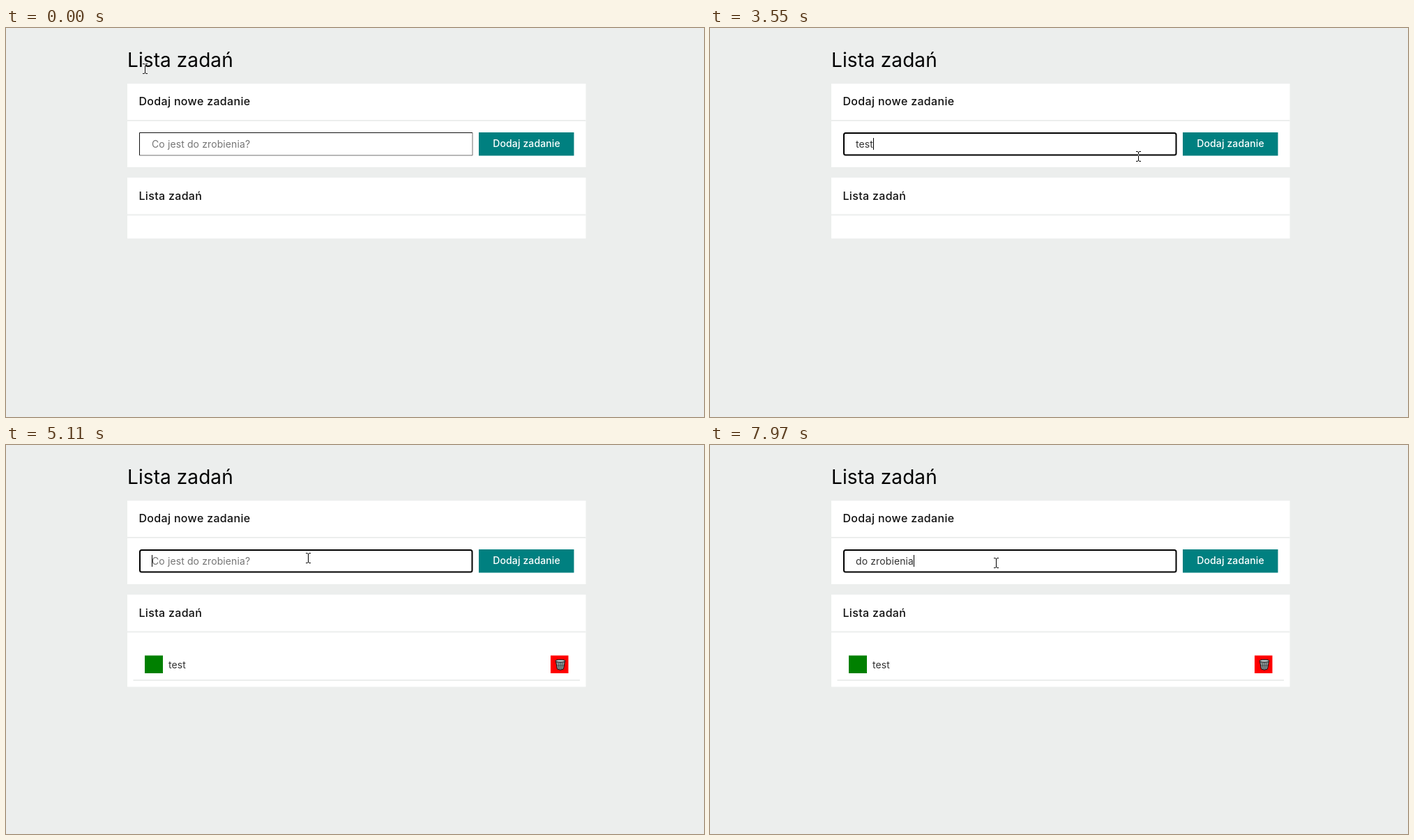
Recreate the animation shown at these times as an HTML page. Size 1001x559 px, loop 8000 ms.

```html
<!DOCTYPE html>
<html lang="pl">
<head>
<meta charset="utf-8">
<title>Lista zadań</title>
<style>
  html, body { margin: 0; width: 100%; height: 100%; overflow: hidden; }
  svg { display: block; width: 1001px; height: 559px; background: #eceeed; font: 14px Inter, "Open Sans", sans-serif; }
  .title { font-size: 28px; letter-spacing: .003em; }
  .head { font-size: 16px; font-weight: 500; letter-spacing: .02em; fill: #111; }
  .label { font-weight: 500; letter-spacing: .008em; fill: #fff; text-anchor: middle; }
  .field { letter-spacing: .008em; }
  .card { fill: #fff; }
  .line { fill: #eceeed; }
  #beam { mix-blend-mode: difference; }
</style>
</head>
<body>
<svg viewBox="0 0 1001 559">
  <text class="title" x="174" y="56">Lista zadań</text>

  <rect class="card" x="174" y="80" width="657.5" height="120"/>
  <rect class="line" x="174" y="132" width="657.5" height="2"/>
  <text class="head" x="190.5" y="111">Dodaj nowe zadanie</text>

  <g id="plain" fill="none">
    <path id="edgeDark" stroke="#111"/>
    <path id="edgeLight" stroke="#707070"/>
  </g>
  <rect id="ring" x="192" y="151" width="476.5" height="31.5" rx="2.5" fill="#fff" stroke="#000" stroke-width="2"/>
  <text class="field" id="value" x="209" y="171.5"></text>
  <rect id="caret" y="158" width="1" height="17"/>

  <rect id="button" y="150" height="33.5" fill="#008080"/>
  <rect id="buttonEdge" x="674" y="151" width="139.5" height="31.5" fill="none" stroke="#0b2f30" stroke-width="2"/>
  <text class="label" id="label" y="171">Dodaj zadanie</text>

  <rect class="card" id="list" x="174" y="215" width="657.5"/>
  <rect class="line" x="174" y="267.5" width="657.5" height="2"/>
  <text class="head" x="190.5" y="247">Lista zadań</text>

  <g id="item">
    <rect x="199" y="302.5" width="26" height="25.5" fill="#008000"/>
    <text class="field" x="233" y="320.5" fill="#333">test</text>
    <rect x="781" y="302.5" width="25.5" height="25.5" fill="#f00"/>
    <g stroke="#111" stroke-linejoin="round">
      <path d="M788.5 311 L790.5 322 Q795 324.5 799.5 322 L801.5 311 Z" fill="#8f9a9c"/>
      <path d="M792 313 L793 322 M795 313 V322.5 M798 313 L797 322 M790 317 H800" stroke="#3a4446" stroke-width=".8"/>
      <ellipse cx="795" cy="310.3" rx="7" ry="2" fill="#b4bec0"/>
    </g>
    <rect class="line" x="182.5" y="337" width="640.5" height="2"/>
  </g>

  <circle id="click" r="11" fill="#f5ea3c" fill-opacity=".62"/>
  <path id="beam" fill="none" stroke="#fff" d="M-3 -7 H-1 L0.5 -6 L2 -7 H4 M0.5 -6 V6 M-3 7 H-1 L0.5 6 L2 7 H4"/>
  <path id="arrow" fill="#fff" stroke="#111" stroke-linejoin="round"
        d="M.5 .5 V15.5 L4 12.2 L6.4 17.6 L8.8 16.5 L6.4 11.3 H11 Z"/>
</svg>
<script>
  const $ = id => document.getElementById(id);
  const LOOP = 8000, STEP = 67, KEY = 133, BLINK = 530;
  const FOCUS = 900, PRESS = 3880, ADD = 4020;

  const words = [
    { text: 'test', from: 1830, until: ADD },
    { text: 'do zrobienia', from: 6500, until: LOOP }
  ];

  // Pointer moves: each runs from where the last one ended
  const home = { x: 199, y: 58 };
  const moves = [
    { from: 70, to: 430, x: 266, y: 157 },
    { from: 1090, to: 1160, x: 283, y: 137 },
    { from: 3070, to: 3590, x: 645, y: 188 },
    { from: 3590, to: 3810, x: 718, y: 168 },
    { from: 4570, to: 5110, x: 446, y: 160 },
    { from: 5110, to: 5370, x: 384, y: 171 },
    { from: 5440, to: 5900, x: 410, y: 169 }
  ];

  function pointer(t) {
    let { x, y } = home;
    for (const move of moves) {
      if (t < move.from) break;
      const elapsed = (Math.floor((t - move.from) / STEP) + 1) * STEP;
      const p = t >= move.to ? 1 : Math.min(1, elapsed / (move.to - move.from + STEP));
      x += (move.x - x) * p;
      y += (move.y - y) * p;
    }
    return [Math.round(x), Math.round(y)];
  }

  // Text typed so far and the time of the last action in the field
  function typed(t) {
    const word = words.find(w => t >= w.from && t < w.until);
    if (!word) return { text: '', last: t >= ADD ? ADD : FOCUS };
    const count = Math.min(word.text.length, Math.floor((t - word.from) / KEY) + 1);
    return {
      text: word.text.slice(0, count).replace(/ $/, '\u00a0'),
      last: word.from + (count - 1) * KEY
    };
  }

  const show = (id, on) => $(id).setAttribute('visibility', on ? 'visible' : 'hidden');
  const set = (id, attrs) => {
    for (const key in attrs) $(id).setAttribute(key, attrs[key]);
  };

  function drawField(t, focused, right) {
    show('plain', !focused);
    show('ring', focused);
    set('edgeDark', { d: `M191.5 183 V150.5 H${right}` });
    set('edgeLight', { d: `M191.5 183 H${right} V150.5` });

    const { text, last } = typed(t), value = $('value');
    value.textContent = text || 'Co jest do zrobienia?';
    value.setAttribute('fill', text ? '#333' : '#757575');
    const width = text ? value.getComputedTextLength() - .5 : 0;
    set('caret', { x: Math.round(209 + width) });
    show('caret', focused && (t - last) % (2 * BLINK) < BLINK);
  }

  function drawPointer(t, clicked) {
    const [x, y] = pointer(t);
    const inField = x > 191 && x < 670 && y > 149 && y < 185;
    const beam = inField || t < 270;
    set('beam', { transform: `translate(${x} ${y + .5})` });
    set('arrow', { transform: `translate(${x} ${y})` });
    set('click', { cx: x, cy: y + 1 });
    show('beam', beam);
    show('arrow', !beam);
    show('click', clicked);
  }

  function draw(t) {
    const pressed = t >= PRESS && t < ADD;
    const added = t >= ADD;

    drawField(t, t >= FOCUS && !pressed, pressed ? 664.5 : 669);
    set('button', { x: pressed ? 673 : 678, width: pressed ? 141.5 : 136.5 });
    set('label', { x: pressed ? 744 : 746.5 });
    show('buttonEdge', pressed);
    set('list', { height: added ? 132.5 : 87.5 });
    show('item', added);
    drawPointer(t, pressed || (t >= FOCUS && t < FOCUS + 70));
  }

  const start = performance.now();
  function frame() {
    draw((performance.now() - start) % LOOP);
    requestAnimationFrame(frame);
  }
  frame();
</script>
</body>
</html>
```
